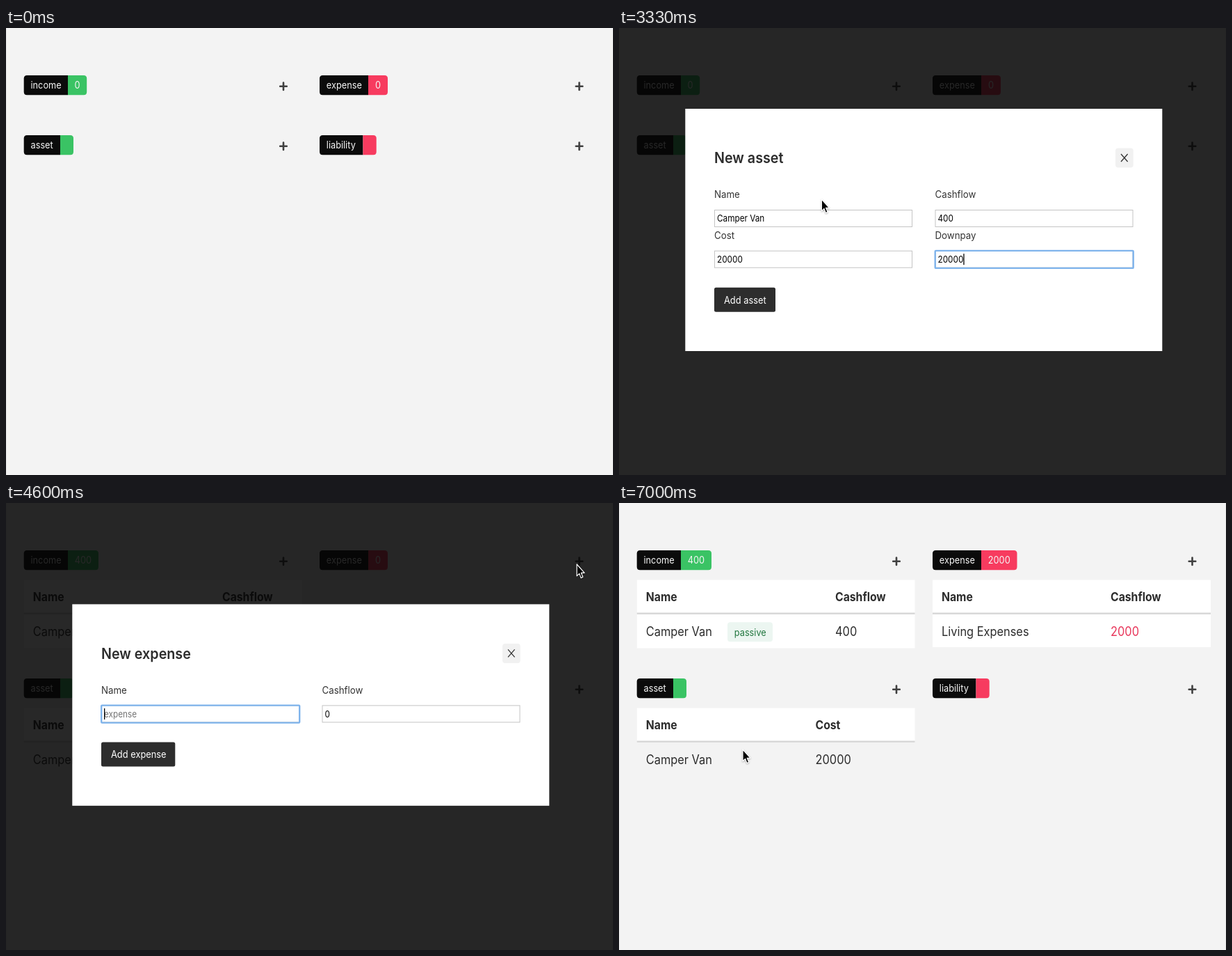
Recreate the animation shown at these times as an HTML page. Size 873 px wide and 642 px high, loop 8000 ms.

```html
<!DOCTYPE html>
<html lang="en">
<head>
<meta charset="utf-8">
<title>Cashflow board</title>
<style>
  html, body { margin: 0; width: 100%; height: 100%; overflow: hidden; background: #f3f3f3; }
  svg { display: block; width: 873px; height: 642px; }
  text { font-family: Inter, "Open Sans", sans-serif; white-space: pre; }
</style>
</head>
<body>
<script>
const NS = "http://www.w3.org/2000/svg";
const LOOP = 8000, FPS = 15;
const SQUEEZE = 0.905; // the page is shown slightly narrowed
const GREEN = "#3ac364", RED = "#f73b5f", INK = "#2d2d2d";

function el(parent, name, attrs = {}) {
  const node = document.createElementNS(NS, name);
  for (const key in attrs) node.setAttribute(key, attrs[key]);
  parent.appendChild(node);
  return node;
}
const group = parent => el(parent, "g");
const show = (node, on) => node.setAttribute("opacity", on ? 1 : 0);
const move = (node, x, y) => node.setAttribute("transform", `translate(${x},${y})`);
const clamp = (v, lo, hi) => Math.min(hi, Math.max(lo, v));

function box(parent, x, y, width, height, fill, rx = 0) {
  return el(parent, "rect", { x, y, width, height, fill, rx });
}
function label(parent, x, y, str, size, fill = INK, weight = 400, anchor = "start") {
  const node = el(parent, "text", {
    transform: `translate(${x},${y}) scale(${SQUEEZE},1)`,
    "font-size": size, "font-weight": weight, "text-anchor": anchor, fill
  });
  node.textContent = str;
  return node;
}

const svg = el(document.body, "svg", { viewBox: "0 0 873 642" });
box(svg, 0, 0, 873, 642, "#f3f3f3");
box(svg, 0, 0, 1, 642, "#e4e4e4");
box(svg, 872, 0, 1, 642, "#e6e6e6");

// Board

function tag(parent, x, name, split, end, color, value = "") {
  const g = group(parent), r = 4.5;
  el(g, "path", { d: `M${split},0H${x + r}q${-r},0 ${-r},${r}v${28.2 - 2 * r}q0,${r} ${r},${r}H${split}z`, fill: "#0b0b0b" });
  el(g, "path", { d: `M${split},0H${end - r}q${r},0 ${r},${r}v${28.2 - 2 * r}q0,${r} ${-r},${r}H${split}z`, fill: color });
  label(g, x + 9.8, 19.3, name, 14.1, "#f5f5f5");
  label(g, (split + end) / 2, 19.3, value, 14.1, "#f5f5f5", 400, "middle");
  return g;
}
function plus(parent, x) {
  el(parent, "path", {
    d: `M${x - 4.8},15.8h9.6M${x},10.6v10.4`, stroke: "#404040",
    "stroke-width": 2.6, "stroke-linecap": "round"
  });
}
function table(parent, x, width, col, head, name, value, rowFill, rowHeight, valueFill) {
  const g = group(parent);
  box(g, x, 42.5, width, 47.5, "#fff");
  box(g, x, 92, width, rowHeight, rowFill);
  box(g, x, 89.5, width, 2.3, "#d6d6d6");
  label(g, x + 13, 73, "Name", 17.4, INK, 700);
  label(g, col, 73, head, 17.4, INK, 700);
  label(g, x + 13, 122.5, name, 18.1);
  label(g, col, 122.5, value, 18.1, valueFill);
  return g;
}

const board = group(svg);
const top1 = group(board), top2 = group(board);
move(top1, 0, 68);
plus(top1, 399);
plus(top1, 824.5);
plus(top2, 399);
plus(top2, 824.5);
const income0 = tag(top1, 25.7, "income", 89, 116.2, GREEN, "0");
const income1 = tag(top1, 25.7, "income", 89, 133, GREEN, "400");
const expense0 = tag(top1, 451, "expense", 521, 549, RED, "0");
const expense1 = tag(top1, 451, "expense", 521, 572.5, RED, "2000");
tag(top2, 25.7, "asset", 78, 97, GREEN);
tag(top2, 451, "liability", 513.5, 532.7, RED);
const incomeTable = table(top1, 25.8, 399.7, 311, "Cashflow", "Camper Van", "400", "#fff", 48.5, INK);
box(incomeTable, 156, 103.3, 65, 28, "#ecf6f1", 4);
label(incomeTable, 165.8, 122.6, "passive", 14.1, "#257942");
const assetTable = table(top2, 25.8, 399.7, 282.5, "Cost", "Camper Van", "20000", "#f3f3f3", 48.5, INK);
const expenseTable = table(top1, 451, 400, 707, "Cashflow", "Living Expenses", "2000", "#fff", 47, "#e8365a");

// Dialogs

function field(parent, x, y, placeholder) {
  const rect = box(parent, x + 0.5, y + 0.5, 284, 24, "#fff");
  rect.setAttribute("stroke", "#c4c4c4");
  const ring = el(parent, "rect", {
    x: x + 0.2, y: y + 0.2, width: 285, height: 25, rx: 1,
    fill: "none", stroke: "#7fb4ec", "stroke-width": 2.4
  });
  const mark = box(parent, x + 4, y + 5, 7.5, 15.5, "#aacbee");
  const text = label(parent, x + 4, y + 17.3, "", 13, "#000");
  const caret = box(parent, x + 4, y + 4.5, 1.3, 16, "#000");
  return (value, focused) => {
    const selected = focused && value === "0";
    text.textContent = value || placeholder;
    text.setAttribute("fill", value ? "#000" : "#757575");
    show(ring, focused);
    show(mark, selected);
    show(caret, focused && !selected);
    const width = value ? text.getComputedTextLength() * SQUEEZE : 0;
    caret.setAttribute("x", x + 4 + width);
  };
}
function dialog(kind, y, height, buttonWidth, rows) {
  const root = group(svg);
  box(root, 0, 0, 873, 642, "rgba(5,5,5,.86)");
  const g = group(root);
  move(g, 0, y);
  box(g, 95.3, 0, 686, height, "#fff");
  label(g, 137, 78.3, "New " + kind, 21.8, INK, 600);
  box(g, 714, 56.5, 25.7, 28, "#f1f1f1", 4);
  el(g, "path", { d: "M722,65l9.6,11m0,-11l-9.6,11", stroke: "#333", "stroke-width": 1.3 });
  const fields = [];
  rows.forEach((names, r) => names.forEach((name, c) => {
    const x = 137 + 317.5 * c, top = 145 + 58.7 * r;
    label(g, x, top - 16.8, name, 14.7, "#363636");
    fields.push(field(g, x, top, kind));
  }));
  const by = height - 91.2;
  box(g, 137, by, buttonWidth, 35, INK, 2.5);
  label(g, 151, by + 22.8, "Add " + kind, 14.2, "#fff");
  return { root, fields };
}
const asset = dialog("asset", 116, 348, 88, [["Name", "Cashflow"], ["Cost", "Downpay"]]);
const expense = dialog("expense", 145.4, 289.4, 106.3, [["Name", "Cashflow"]]);

const pointer = el(svg, "path", {
  d: "M0,0V16.8L3.6,13.4 6,19.6 8.7,18.3 6.2,12.3H11z",
  fill: "#000", stroke: "#fff", "stroke-width": 1.2, "stroke-linejoin": "round"
});
pointer.style.filter = "drop-shadow(0 1px 1px rgba(0,0,0,.3))";

// Pointer moves: first tick, last tick, tick when it leaves the screen or moves on, waypoints
const moves = [
  [1, 5, 9, [[430, 650], [403, 166]]],
  [9, 12, 13, [[403, 166], [400, 85], [385, 272]]],
  [49, 54, 64, [[330, 196], [181, 389]]],
  [64, 68, 72, [[181, 389], [821, 88]]],
  [72, 75, 76, [[821, 88], [131, 356]]],
  [101, 104, 120, [[131, 356], [178, 354]]]
];
function pointerAt(k) {
  const leg = moves.find(([first, , until]) => k >= first && k < until);
  if (!leg) return null;
  const [first, last, , points] = leg;
  const u = clamp((k - first + 1) / (last - first + 1), 0, 1);
  const pos = u * u * (3 - 2 * u) * (points.length - 1);
  const i = Math.min(Math.floor(pos), points.length - 2);
  return points[i].map((v, axis) => v + (points[i + 1][axis] - v) * (pos - i));
}

function typed(str, k, first, last) {
  const n = Math.round((k - first + 1) / (last - first + 1) * str.length);
  return str.slice(0, clamp(n, 0, str.length));
}
// Index of the latest start that has passed, -1 for none
const stage = (k, starts) => starts.filter(s => k >= s).length - 1;

function draw(time) {
  const k = Math.floor(time * FPS / 1000 + 0.06);
  const hasAsset = k >= 56, hasExpense = k >= 105;

  show(income0, !hasAsset);
  show(income1, hasAsset);
  show(incomeTable, hasAsset);
  show(assetTable, hasAsset);
  show(expense0, !hasExpense);
  show(expense1, hasExpense);
  show(expenseTable, hasExpense);
  move(top2, 0, hasAsset ? 252 : 154);

  show(asset.root, k >= 6 && !hasAsset);
  const assetFocus = stage(k, [6, 21, 29, 40, 55]);
  [
    typed("Camper Van", k, 13, 20),
    typed("400", k, 25, 27) || "0",
    typed("20000", k, 33, 38) || "0",
    typed("20000", k, 43, 48) || "0"
  ].forEach((value, i) => asset.fields[i](value, assetFocus === i));

  show(expense.root, k >= 69 && !hasExpense);
  const expenseFocus = stage(k, [69, 87, 104]);
  [
    typed("Living Expenses", k, 76, 86),
    typed("2000", k, 93, 97) || "0"
  ].forEach((value, i) => expense.fields[i](value, expenseFocus === i));

  const at = pointerAt(k);
  show(pointer, at);
  if (at) move(pointer, ...at);
}

const start = performance.now();
function tick() {
  draw((performance.now() - start) % LOOP);
  requestAnimationFrame(tick);
}
tick();
</script>
</body>
</html>
```
